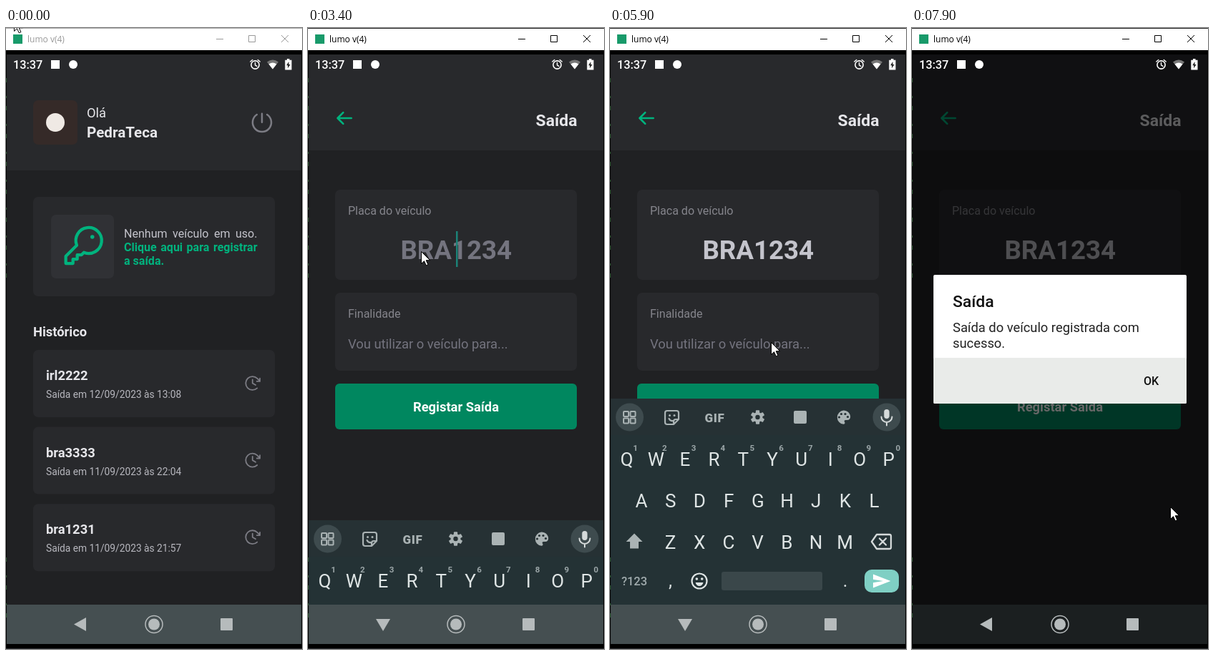
Write an HTML page that moves like this. It is 414x868 px and loops after 8000 ms.

```html
<!DOCTYPE html>
<html lang="pt">
<head>
<meta charset="utf-8">
<title>Registro de saída</title>
<style>
html, body { margin: 0; width: 100%; height: 100%; overflow: hidden; background: #000; }
svg { display: block; width: 100vw; height: 100vh; }
text { font-family: Roboto, sans-serif; white-space: pre; }
.b { font-weight: 700; }
.m { font-weight: 500; }
.mid { text-anchor: middle; }
.line { fill: none; stroke-linecap: round; stroke-linejoin: round; }
</style>
</head>
<body>
<svg id="stage" viewBox="0 0 414 868"></svg>
<script>
const LOOP = 8000, STEP = 100;
const BODY = '#202123', PANEL = '#28292c', GREEN = '#00b37e', BUTTON = '#00875f';
const WHITE = '#e6e6ea', SOFT = '#c4c4cc', DIM = '#7c7c84', KEY = '#dfe5e5', ICON = '#aab3b4';
// Type sizes in dp, times the screen density
const DP = 1.147, XS = 12 * DP, S = 14 * DP, M = 16 * DP, L = 18 * DP, XL = 20 * DP, PLATE = 32 * DP;

const rect = (x, y, w, h, fill, r = 0, extra = '') =>
  `<rect x="${x}" y="${y}" width="${w}" height="${h}" rx="${r}" fill="${fill}" ${extra}/>`;
const circle = (x, y, r, fill, extra = '') => `<circle cx="${x}" cy="${y}" r="${r}" fill="${fill}" ${extra}/>`;
const text = (x, y, size, fill, str, cls = '', extra = '') =>
  `<text x="${x}" y="${y}" font-size="${size}" fill="${fill}" class="${cls}" ${extra}>${str}</text>`;
const line = (d, color, w, extra = '') => `<path class="line" d="${d}" stroke="${color}" stroke-width="${w}" ${extra}/>`;
const fillPath = (d, fill, extra = '') => `<path d="${d}" fill="${fill}" ${extra}/>`;
const group = (id, body, extra = '') => `<g id="${id}" ${extra}>${body}</g>`;
// Icon on a 256 grid, centred on x, y
const icon = (x, y, size, body) =>
  `<g transform="translate(${x} ${y}) scale(${size / 256}) translate(-128 -128)">${body}</g>`;

function titleBar() {
  return rect(0, 0, 414, 31, '#fff') + rect(10, 9, 13, 13, '#189a6a') +
    text(30, 20, 12, '#000', 'lumo v(4)', '', 'id="title" style="font-family:\'Open Sans\',sans-serif"') +
    group('buttons', '<path d="M294 15.5h10M339.5 10.5h9v9h-9zM385 10l10 10M395 10l-10 10" fill="none"/>', 'stroke="#000"') +
    rect(0, 0, 414, 1, '#222', 0, 'id="edge"');
}

function statusBar() {
  return text(10, 57, 16.3, '#fff', '13:37', 'm') + rect(63, 45, 12, 12, '#fff') + circle(94, 51, 6, '#fff') +
    circle(348.5, 51.5, 5.6, 'none', 'stroke="#fff" stroke-width="1.6"') +
    line('M348.5 48.5v3.4l2.4 1.5M341.8 47l3-2.5M355.2 47l-3-2.5', '#fff', 1.4) +
    fillPath('M365 47.5q8-6 16 0l-8 10z', '#777') + fillPath('M367.5 50.5q5.5-4 11 0l-5.500 7z', '#fff') +
    fillPath('M393 43h3.500v1.800h3v13.700h-9.200v-13.700h2.700z', '#fff') + fillPath('M395.500 47l-3.300 5.200h2v4l3.400-5.300h-2.100z', '#222');
}

function historyRow(plate, when, i) {
  const y = 450 + i * 107.6;
  const clock = line('M128 80v48l40 24M184 104h40V64M188 192A88 88 0 1 1 190 66L224 100', DIM, 17);
  return rect(38, y, 338, 94, PANEL, 7) + text(56, y + 42, M, WHITE, plate, 'b') +
    text(56, y + 67, XS, '#b8b8bf', 'Saída em ' + when) + icon(344.800, y + 46.500, 27.5, clock);
}

function home() {
  const key = line('M93.200 122.800a72 72 0 1 1 40 40L120 176H96v24H72v24H32v-40Z', GREEN, 17) + circle(180, 76, 11, GREEN);
  const power = line('M128 46v80M176 54.200a88 88 0 1 1-96 0', DIM, 17);
  const card = rect(38, 236, 338, 139, PANEL, 7) + rect(63, 261, 88, 89, '#303135', 7) + icon(107.700, 305, 64.2, key) +
    text(165, 293, S, SOFT, 'Nenhum veículo em uso.', 'justify') +
    text(165, 312, S, GREEN, 'Clique aqui para registrar', 'b justify') + text(165, 330.5, S, GREEN, 'a saída.', 'b');
  const rows = [['irl2222', '12/09/2023 às 13:08'], ['bra3333', '11/09/2023 às 22:04'], ['bra1231', '11/09/2023 às 21:57']];
  return rect(0, 37, 414, 824, BODY) + rect(0, 37, 414, 162, PANEL) + rect(38, 101, 62, 62, '#352a28', 7) +
    circle(69, 132, 13, '#efe9e4') + text(113, 125, M, WHITE, 'Olá') + text(113, 153, L, WHITE, 'PedraTeca', 'b') +
    icon(358, 132, 38, power) + group('card', card) + text(38, 431, M, WHITE, 'Histórico', 'b') +
    rows.map((r, i) => historyRow(...r, i)).join('');
}

function form() {
  const arrow = line('M216 128H40M112 56L40 128l72 72', GREEN, 24);
  return rect(0, 37, 414, 824, BODY) + rect(0, 37, 414, 134, PANEL) + icon(51, 126, 28, arrow) +
    text(376.5, 137, XL, WHITE, 'Saída', 'b', 'text-anchor="end"') +
    rect(38, 226, 338, 126, PANEL, 7) + text(56, 261, S, '#85858c', 'Placa do veículo') +
    text(207.300, 323, PLATE, DIM, '', 'b mid', 'id="plate"') + rect(0, 284, 2.5, 50, '#1b8277', 0, 'id="plateCaret"') +
    rect(38, 370, 338, 109, PANEL, 7) + text(56, 405, S, '#85858c', 'Finalidade') +
    text(56, 448, M, DIM, '', '', 'id="use"') + rect(0, 428, 2, 25, '#1b8277', 0, 'id="useCaret"') +
    rect(38, 497, 338, 64, BUTTON, 6) + text(207, 536, M, '#fff', 'Registar Saída', 'b mid');
}

function letters(upper) {
  const rows = ['qwertyuiop', 'asdfghjkl', 'zxcvbnm'], starts = [23.5, 44, 84.5], bases = [612, 669.5, 727.5];
  return rows.map((row, r) => [...row].map((c, i) =>
    text(starts[r] + i * 40.7, bases[r] - (upper ? 0 : 2), 26, KEY, upper ? c.toUpperCase() : c, 'mid')).join('')).join('');
}

function tools() {
  const teeth = Array.from({ length: 6 }, (_, i) => rect(-2.600, -9.800, 5.200, 6, ICON, 1, `transform="rotate(${i * 60})"`)).join('');
  const bg = '#263134';
  return line('M80 535h13q3 0 3 3v9l-7 7h-9q-3 0-3-3v-13q0-3 3-3M96 547h-4q-3 0-3 3v4M82.500 546q2 4 6 3', ICON, 2.2) +
    circle(83.500, 541.500, 1.500, ICON) + circle(90, 541.500, 1.500, ICON) +
    text(146.500, 550.5, 17, ICON, 'GIF', 'mid', 'font-weight="900" letter-spacing="0.6"') +
    `<g transform="translate(206.500 544)">${teeth}${circle(0, 0, 7, ICON)}${circle(0, 0, 3.2, bg)}</g>` +
    rect(257, 535, 18, 18, ICON, 2) +
    fillPath('M326.500 534.500a9.700 9.700 0 0 0 0 19.300c2 0 2.600-1.800 1.500-3.200-.9-1.300 0-2.700 1.700-2.700h2.300c2.500 0 4.200-2 4.200-4.500 0-5-4.400-8.900-9.700-8.900', ICON) +
    [[320.500, 544], [323.500, 539.500], [329, 539.500], [332.500, 543.500]].map(p => circle(...p, 1.6, bg)).join('');
}

function keyboard() {
  const grid = [[19, 536], [28.500, 536], [19, 545.500], [28.500, 545.500]].map(([x, y]) =>
    rect(x, y, 7, 7, 'none', 1, `stroke="${ICON}" stroke-width="2"`)).join('');
  const mic = rect(383.300, 533, 7.400, 13, '#d5dada', 3.700) + line('M379.500 543.500a7.500 7.500 0 0 0 15 0M387 551.500v4', '#d5dada', 2);
  const digits = [...'1234567890'].map((d, i) => text(35.500 + i * 40.8, 591, 11.5, '#9ba6a8', d, 'mid b')).join('');
  const words = [100, 206, 311].map((x, i) => text(x, 552, 20, KEY, '', 'mid', `id="word${i}"`)).join('');
  const shift = 'M34 706.500l11.500 11.500h-5.500v9.500h-12v-9.500h-5.500z';
  return rect(0, 518, 414, 290, '#243235') + rect(0, 518, 414, 51, '#263134') +
    circle(27.5, 544, 19.5, '#3e4b4e') + grid + circle(387, 544, 19.5, '#3e4b4e') + mic + group('tools', tools()) +
    group('words', words + rect(150, 530, 1, 28, '#46555a') + rect(262, 530, 1, 28, '#46555a')) + digits +
    group('upper', letters(true) + fillPath(shift, ICON)) + group('lower', letters(false) + line(shift, '#d5dada', 2.2)) +
    line('M373 708h18q2 0 2 2v16q0 2-2 2h-18l-7-10zM377 713.500l9 9M386 713.500l-9 9', '#d5dada', 2.3) +
    text(34, 779, 16.5, '#a0abad', '?123', 'mid m') + text(84.500, 781, 25, KEY, ',', 'mid') + text(329, 781, 25, KEY, '.', 'mid') +
    circle(125, 773, 10.5, 'none', `stroke="${KEY}" stroke-width="2.2"`) + circle(121.300, 770, 1.8, KEY) + circle(128.700, 770, 1.8, KEY) +
    fillPath('M119.500 775h11q-1.500 5-5.500 5t-5.500-5', KEY) + rect(156, 760, 141, 26, '#3a474a', 3) +
    rect(356, 757, 48, 32, '#7fcfc4', 10, 'id="enter"') +
    line('M369 773h16M380.500 767.500l5.500 5.500-5.500 5.500M391 767v12', '#fff', 2.6, 'id="tab"') +
    fillPath('M368 763.500l24.500 9.500-24.500 9.500v-7.300l14-2.200-14-2.200z', '#fff', 'id="send"');
}

function navBar() {
  const c = '#b6bbbc';
  return fillPath('M95 833.500l17-9.500v19z', c, 'id="back"') + fillPath('M95 826h20l-10 17z', c, 'id="hide"') +
    circle(207, 833.5, 12, 'none', `stroke="${c}" stroke-width="1.5"`) + circle(207, 833.5, 8, c) + rect(300, 825, 17, 17, c, 1);
}

function dialog() {
  return rect(30, 345, 354, 180, '#fff', 2) + rect(30, 461, 354, 64, '#e9ebe9', 2) +
    text(57, 390, XL, '#111', 'Saída', 'm') + text(57, 425, M, '#222', 'Saída do veículo registrada com') +
    text(57, 447, M, '#222', 'sucesso.') + text(334.500, 499, S, '#111', 'OK', 'mid m');
}

const stage = document.getElementById('stage');
stage.innerHTML = '<clipPath id="screen"><rect x="1" y="37" width="412" height="824"/></clipPath>' +
  '<clipPath id="above"><rect x="1" y="37" width="412" height="770"/></clipPath>' + rect(0, 0, 414, 868, '#000') + titleBar() +
  `<g clip-path="url(#screen)">${group('home', home()) + group('form', form())}` +
  `<g clip-path="url(#above)">${group('keyboard', keyboard())}</g>` + rect(0, 806, 414, 55, '#454f51') +
  rect(0, 37, 414, 824, '#000', 0, 'id="shade"') + navBar() + group('dialog', dialog()) + statusBar() + '</g>' +
  '<path d="M.500 70V350M.500 740V840" stroke="#2f6b35" stroke-dasharray="6 19 3 11" opacity=".7"/>' + rect(0, 867, 414, 1, '#2a2d2f') +
  '<path id="cursor" d="M0 0v17l4-3.800 2.700 6.100 2.700-1.100-2.700-6h5.500z" fill="#fff" stroke="#000"/>';

const el = {};
stage.querySelectorAll('[id]').forEach(n => el[n.id] = n);
const set = (id, name, value) => el[id].setAttribute(name, value);
const show = (id, on) => set(id, 'visibility', on ? 'inherit' : 'hidden');
const fade = (id, v) => { set(id, 'opacity', v); show(id, v > 0); };
const write = (id, str) => { if (el[id].textContent !== str) el[id].textContent = str; };

stage.querySelectorAll('.justify').forEach(n => {
  const gaps = n.textContent.split(' ').length - 1;
  n.style.wordSpacing = (186.5 - n.getComputedTextLength()) / gaps + 'px';
});

// Keys are [time, value, ...]; linear in between
function track(keys, t) {
  const i = keys.findIndex(k => k[0] > t);
  if (i < 0) return keys[keys.length - 1].slice(1);
  if (!i) return keys[0].slice(1);
  const a = keys[i - 1], b = keys[i], p = (t - a[0]) / (b[0] - a[0]);
  return a.slice(1).map((v, j) => v + (b[j + 1] - v) * p);
}
const MOUSE = [[100, 11, -13], [600, 182, 331], [1000, 182, 331], [1600, 174, 416], [1700, 174, 416], [2000, 164, 338],
  [2400, 164, 338], [2800, 158, 312], [4900, 158, 312], [5000, 224, 429], [5100, 225, 431], [5700, 225, 431], [5900, 225, 439],
  [6400, 225, 439], [6700, 401, 737], [6900, 399, 766], [7000, 392, 768], [7100, 392, 768], [7300, 354, 652], [7500, 354, 652], [7600, 361, 669]];
const PRESS = [[600, 1], [700, .5], [800, .22], [900, .55], [1000, 1]];
const SLIDE = [[3300, 290], [3400, 170], [3500, 50], [3600, 0], [7500, 0], [7600, 150], [7700, 290]];
const DIALOG = [[7600, 0], [7700, .3], [7800, .75], [7900, 1]];
const PLATE_KEYS = [3900, 4000, 4200, 4400, 4500, 4700, 4800], USE_KEYS = [6100, 6200, 6300, 6400, 6500];
const HINTS = { B: 'BOM BEM', BR: 'BRASIL BRANCO', BRA: 'BRASIL BRAÇO', T: 'TEM TUDO', TE: 'TEM TER',
  TES: 'TESTE TESES', TEST: 'TESTE TESTES', TESTE: 'TESTES TESTEI' };

const typed = (str, times, t) => str.slice(0, times.filter(k => t >= k).length);
const within = (t, ...spans) => spans.some(([a, b]) => t >= a && t < b);
const zoom = s => `translate(207 421) scale(${s}) translate(-207 -421)`;

function field(id, value, hint, x, on) {
  write(id, value || hint);
  set(id, 'fill', value ? SOFT : '#74747f');
  const w = value ? el[id].getComputedTextLength() : 0;
  set(id + 'Caret', 'x', x(w));
  show(id + 'Caret', on);
}

function draw(ms) {
  const t = Math.floor(ms / STEP) * STEP, active = t >= 700;
  set('title', 'fill', active ? '#000' : '#999');
  set('buttons', 'stroke', active ? '#000' : '#999');
  set('edge', 'fill', active ? '#222' : '#aaa');
  set('cursor', 'transform', `translate(${track(MOUSE, t).map(v => v + .5)})`);

  // The new screen grows in while the old one zooms past; it hangs briefly near the end
  const p = t >= 1600 ? 1 : Math.max(0, Math.min(.8, (t - 1000) / 500));
  set('home', 'transform', zoom(1 + .15 * p));
  show('home', p < 1);
  set('form', 'transform', zoom(.85 + .15 * p));
  fade('form', p);
  set('card', 'opacity', track(PRESS, t)[0]);

  const plate = typed('BRA1234', PLATE_KEYS, t), use = typed('TESTE', USE_KEYS, t);
  field('plate', plate, 'BRA1234', w => 207 + w / 2, within(t, [3200, 3600], [3900, 5300]));
  field('use', use, 'Vou utilizar o veículo para...', w => 56 + w, within(t, [5300, 5800], [6100, 7600]));

  const slide = track(SLIDE, t)[0], open = within(t, [3400, 7700]);
  set('keyboard', 'transform', `translate(0 ${slide})`);
  show('keyboard', open);
  show('hide', open);
  show('back', !open);
  const hinting = within(t, [3900, 5000], [6100, 7700]), word = use || plate;
  show('words', hinting);
  show('tools', !hinting);
  [word, ...(HINTS[word] || 'BRA BRASIL').split(' ')].forEach((w, i) => write('word' + i, w));
  show('upper', t < 6100);
  show('lower', t >= 6100);
  show('tab', t < 5300);
  show('send', t >= 5300);
  set('enter', 'fill', t === 7200 ? '#68b5ab' : '#7fcfc4');

  const d = track(DIALOG, t)[0];
  fade('shade', .6 * d);
  fade('dialog', d);
}

const start = performance.now();
function tick() {
  draw((performance.now() - start) % LOOP);
  requestAnimationFrame(tick);
}
tick();
</script>
</body>
</html>
```
